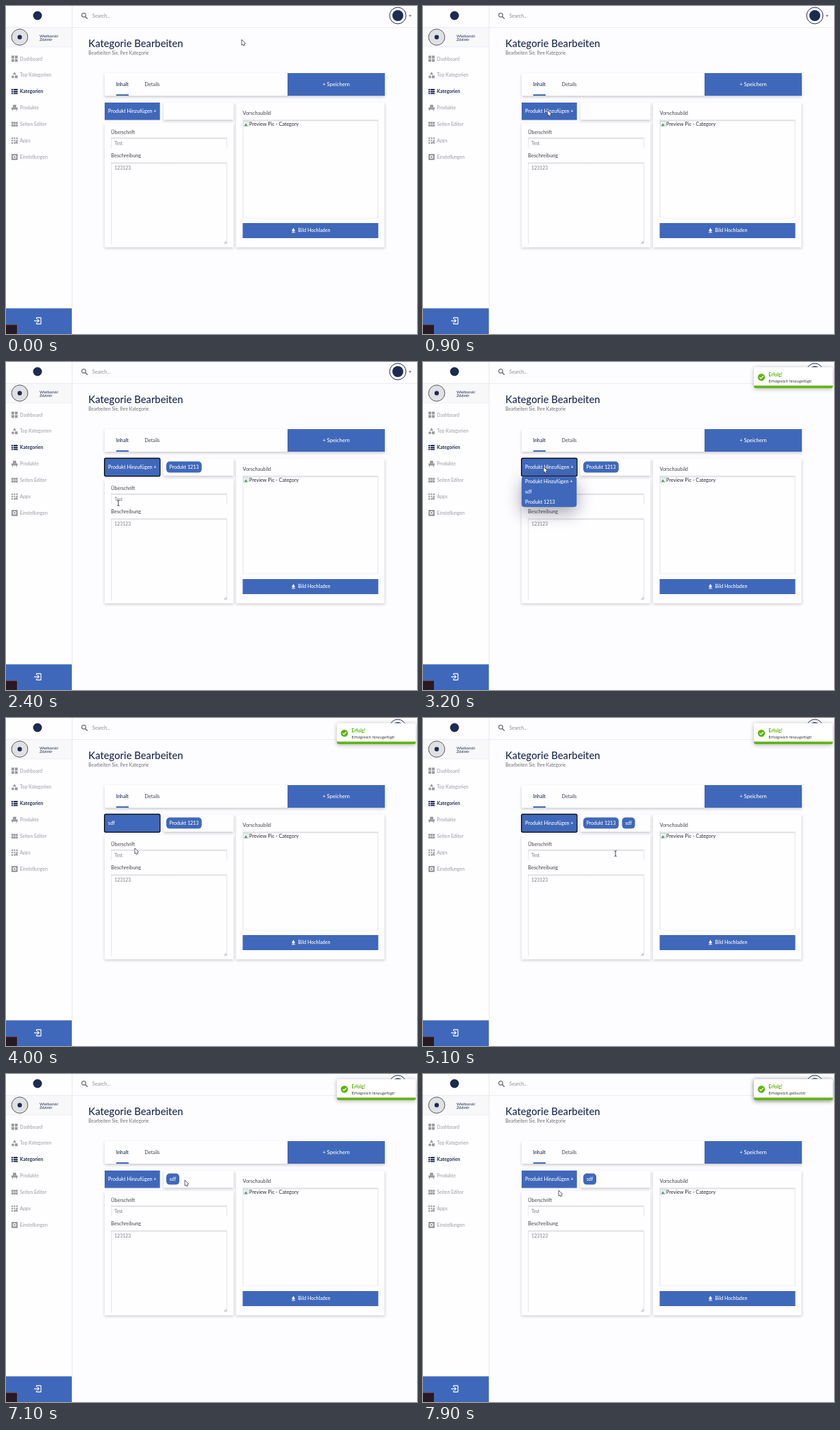
Write an HTML page with a canvas that moves like this. It is 600 px wide and 479 px high and loops after 8 s.

```html
<!DOCTYPE html>
<html lang="de">
<head>
<meta charset="utf-8">
<title>Kategorie Bearbeiten</title>
<style>
html, body { margin: 0; width: 100%; height: 100%; overflow: hidden; background: #fdfcfe; }
canvas { display: block; width: 100vw; height: 100vh; }
</style>
</head>
<body>
<canvas id="stage"></canvas>
<script>
const W = 600, H = 479, LOOP = 8000, STEP = 100, ROW = 14.9;
const BLUE = '#4068ba', NAVY = '#1d2b50', GREY = '#9a9a9e', TEXT = '#43464e', GREEN = '#5fb30f';
const canvas = document.getElementById('stage');
const ctx = canvas.getContext('2d');
const dpr = window.devicePixelRatio || 1;
canvas.width = W * dpr;
canvas.height = H * dpr;

const clamp = k => Math.max(0, Math.min(1, k));
const ease = k => k * k * (3 - 2 * k);
const progress = (t, from, to) => ease(clamp((t - from) / (to - from)));
const between = (v, a, b) => v >= a && v < b;

// Pointer moves, each from wherever the last one ended
const HOME = { x: 344, y: 49 };
const MOVES = [
  { from: 100, to: 900, x: 182, y: 152 },
  { from: 1200, to: 1600, x: 165, y: 200 },
  { from: 1600, to: 1700, x: 164, y: 206 },
  { from: 2700, to: 3100, x: 176, y: 153 },
  { from: 3500, to: 3900, x: 188, y: 190 },
  { from: 4300, to: 5100, x: 281, y: 198 },
  { from: 5200, to: 5800, x: 261, y: 155 },
  { from: 7200, to: 7800, x: 198, y: 170 }
];

function pointerAt(t) {
  return MOVES.reduce((p, m) => {
    const k = progress(t, m.from, m.to);
    return { x: p.x + (m.x - p.x) * k, y: p.y + (m.y - p.y) * k };
  }, HOME);
}

function at(x, y, draw) {
  ctx.save();
  ctx.translate(x, y);
  draw();
  ctx.restore();
}

function rect(x, y, w, h, fill) {
  ctx.fillStyle = fill;
  ctx.fillRect(x, y, w, h);
}

function paint(fill, stroke, width = 1) {
  if (fill) {
    ctx.fillStyle = fill;
    ctx.fill();
  }
  if (stroke) {
    ctx.strokeStyle = stroke;
    ctx.lineWidth = width;
    ctx.stroke();
  }
}

function round(x, y, w, h, r, ...style) {
  ctx.beginPath();
  ctx.roundRect(x, y, w, h, r);
  paint(...style);
}

function disc(x, y, r, ...style) {
  ctx.beginPath();
  ctx.arc(x, y, r, 0, Math.PI * 2);
  paint(...style);
}

function poly(points, ...style) {
  ctx.beginPath();
  points.forEach(p => ctx.lineTo(...p));
  ctx.closePath();
  paint(...style);
}

function line(points, color, width = 1) {
  ctx.beginPath();
  points.forEach(p => ctx.lineTo(...p));
  paint(null, color, width);
}

// Triangle around a centre, pointing up (dir 1) or down (dir -1)
const triangle = (x, y, r, dir, fill) =>
  poly([[x, y - r * dir], [x + r, y + r * dir * 0.7], [x - r, y + r * dir * 0.7]], fill);

function text(str, x, y, size, color, weight = 400, align = 'left') {
  ctx.font = `${weight} ${size}px Lato, "Open Sans", sans-serif`;
  ctx.textAlign = align;
  ctx.fillStyle = color;
  ctx.fillText(str, x, y);
}

function shadowed(blur, dy, alpha, draw) {
  ctx.save();
  ctx.shadowColor = `rgba(40,40,60,${alpha})`;
  ctx.shadowBlur = blur * dpr;
  ctx.shadowOffsetY = dy * dpr;
  draw();
  ctx.restore();
}

const card = (x, y, w, h) => shadowed(4, 1.5, 0.24, () => rect(x, y, w, h, '#fefdff'));

// Field with an inset shadow along the top and sides
function field(x, y, w, h) {
  const g = ctx.createLinearGradient(0, y, 0, y + 3);
  g.addColorStop(0, '#c4c4c9');
  g.addColorStop(1, 'rgba(255,255,255,0)');
  rect(x, y, w, 3, g);
  [x, x + w - 1].forEach(edge => rect(edge, y, 1, h, '#e4e4e8'));
}

// Cells spread evenly over a 9 px icon
function grid(cols, rows, gap, color, height = 9) {
  const w = (9 + gap) / cols, h = (height + gap) / rows;
  for (let i = 0; i < cols * rows; i++) {
    rect(i % cols * w, (9 - height) / 2 + Math.floor(i / cols) * h, w - gap, h - gap, color);
  }
}

const MENU = [
  ['Dashboard', c => grid(2, 2, 1, c)],
  ['Top Kategorien', c => {
    triangle(4.5, 2, 2.5, 1, c);
    disc(2, 7, 2, c);
    rect(5, 5, 4, 4, c);
  }],
  ['Kategorien', c => {
    grid(1, 3, 0.8, c, 7.5);
    rect(2, 0, 0.8, 9, '#fff');
  }],
  ['Produkte', c => {
    round(2, 0, 5, 4, 1, c);
    rect(0, 4, 9, 3, c);
    [1, 7].forEach(x => rect(x, 7, 1, 2, c));
  }],
  ['Seiten Editor', c => grid(3, 2, 0.6, c, 7)],
  ['Apps', c => {
    grid(3, 3, 1.3, c);
    line([[4.5, 9], [9, 4.5]], c, 1.2);
  }],
  ['Einstellungen', c => {
    round(0, 0, 9, 9, 1, c);
    disc(4.5, 4.5, 2, null, '#fff', 1.2);
  }]
];

function sidebar() {
  rect(0, 0, 96, H, '#fefdff');
  rect(96, 0, 1, H, '#e9e9ee');
  disc(46, 14, 6.5, NAVY);
  rect(0, 31, 96, 29, '#f8f8f9');
  rect(0, 59.5, 96, 0.8, '#ececef');
  disc(20, 45.5, 11.8, '#e1e1e4', '#55585f');
  disc(20, 45.5, 3.2, NAVY);
  text('Wielborski', 49, 45.6, 5.7, NAVY);
  text('Zdzimir', 49, 50.6, 5.7, NAVY);
  MENU.forEach(([label, icon], i) => {
    const y = 77 + i * 23.9, active = label === 'Kategorien', color = active ? NAVY : GREY;
    at(8, y - 4.5, () => icon(color));
    text(label, 20.3, y + 2.5, 6.9, color, active ? 700 : 400);
  });
  rect(0, 441.5, 96, 38, BLUE);
  at(46, 459.8, () => {
    round(-1.5, -4.6, 6.5, 9.2, 0.5, null, '#fff', 1.2);
    rect(-2.5, -2.6, 2, 5.2, BLUE);
    line([[-5, 0], [2, 0]], '#fff', 1.2);
    line([[-0.2, -2.4], [2.2, 0], [-0.2, 2.4]], '#fff', 1.2);
  });
  rect(0, 465, 16, 14, '#281a22');
  rect(0, 465, 16, 0.8, '#8a4a68');
}

function header() {
  rect(0, 31, W, 0.8, '#e9e9ee');
  disc(113.5, 13.3, 2.9, null, '#707278', 1.2);
  line([[115.6, 15.4], [119, 18.8]], '#707278', 1.5);
  text('Search...', 126, 17, 7.2, '#8b8d93');
  disc(572, 14, 12, '#fff', NAVY);
  disc(572, 14, 8, NAVY);
  triangle(590, 14.3, 2, -1, '#888a90');
}

function brokenImage(x, y) {
  rect(x, y, 8, 8, '#c9ccd1');
  rect(x + 0.7, y + 0.7, 6.6, 6.6, '#eaf1fb');
  triangle(x + 4, y + 5.6, 2.5, 1, '#5aa34b');
}

function page() {
  rect(0, 0, W, H, '#fdfcfe');
  sidebar();
  header();
  text('Kategorie Bearbeiten', 120.3, 60, 14.8, NAVY, 500);
  text('Bearbeiten Sie, Ihre Kategorie', 120.3, 71.3, 6.75, '#6d7078');

  card(144, 98, 409, 33);
  rect(411, 98, 142, 33, BLUE);
  text('Inhalt', 160.7, 117.2, 7.3, NAVY, 500);
  text('Details', 202.6, 117.2, 7.2, TEXT);
  rect(161, 129, 18, 2, BLUE);
  text('+ Speichern', 482, 117.2, 7.6, '#fff', 500, 'center');

  card(230, 141, 102, 25);
  card(144, 171, 188, 181.5);
  card(336, 141, 216.5, 211.5);

  text('Überschrift', 153.3, 186.6, 7.1, TEXT);
  field(153.3, 192.5, 169.5, 15);
  text('Test', 158.3, 203, 6.7, '#7d8087');
  text('Beschreibung', 153.3, 220.6, 7.4, TEXT);
  field(153.3, 228.7, 169.5, 119.5);
  text('123123', 158.3, 239.4, 6.9, '#7d8087');
  [1.5, 3.5].forEach(d => line([[322 - d, 347], [322, 347 - d]], '#777', 0.7));

  text('Vorschaubild', 345.5, 158.6, 7.35, TEXT);
  field(345.5, 166.5, 198, 143);
  rect(345.5, 309, 198, 0.7, '#eeeef1');
  brokenImage(346.2, 168);
  text('Preview Pic - Category', 355, 174.6, 7.25, '#26282d');
  rect(345.5, 317, 198, 22, BLUE);
  triangle(419.6, 326.6, 2.6, 1, '#fff');
  rect(418.5, 328, 2.2, 1.6, '#fff');
  rect(417, 330.3, 5.2, 0.9, '#fff');
  text('Bild Hochladen', 426.3, 330.4, 7.05, '#fff', 500);
}

function select(label, focused) {
  rect(144, 141, 80.7, 25.5, BLUE);
  text(label, 149, 156, 7.3, '#fff', 500);
  if (focused) round(143.7, 140.5, 81.2, 26.3, 2, null, '#0c0f18', 1.4);
}

function dropdown(hover) {
  const x = 144, y = 167, w = 80.3, h = ROW * 3;
  shadowed(24, 8, 0.42, () => round(x, y, w, h, 4, BLUE));
  if (hover > 0) round(x, y + hover * ROW, w, ROW, hover === 2 ? [0, 0, 4, 4] : 0, '#2168d0');
  ['Produkt Hinzufügen +', 'sdf', 'Produkt 1213'].forEach((label, i) =>
    text(label, x + 5, y + 10 + i * ROW, 7.2, '#fff', 500));
}

function chip(x, w, label, trash) {
  const mid = x + w / 2;
  round(x, 145.2, w, 16.4, 5, BLUE);
  if (!trash) return text(label, mid, 156.1, 7.05, '#fff', 500, 'center');
  rect(mid - 3.2, 150, 6.4, 1, '#fff');
  rect(mid - 1.4, 149.3, 2.8, 1, '#fff');
  round(mid - 2.7, 151.7, 5.4, 6.2, [0, 0, 1, 1], '#fff');
}

function toast(t, from, message) {
  if (t < from) return;
  at(483 + 120 * (1 - progress(t, from, from + 500)), 7.5, () => {
    shadowed(6, 1, 0.35, () => round(0, 0, 115.3, 30.7, 3, '#fff'));
    round(0, 26.9, 115.3, 3.8, [0, 0, 3, 3], GREEN);
    disc(11, 14.7, 5.2, GREEN);
    line([[8.4, 14.8], [10.3, 16.7], [13.8, 13]], '#fff', 1.2);
    text('Erfolg!', 21.5, 13.2, 6.9, GREEN, 700);
    text(message, 21.5, 22, 6.05, '#3b3d42');
  });
}

function arrow() {
  line([[2, 5], [3.7, 9]], '#33353b', 2.6);
  poly([[0, 0], [0, 8], [5.6, 5.6]], '#fff', '#33353b', 0.8);
  line([[2, 5], [3.5, 8.6]], '#fff', 1.2);
}

function beam() {
  line([[0, -3.6], [0, 3.6]], '#25272c', 0.9);
  [-1, 1].forEach(s => line([[-1.8, s * 4.2], [0, s * 3.4], [1.8, s * 4.2]], '#25272c', 0.8));
}

function hand() {
  round(-2.4, 4, 7, 6, 2, '#fff', '#22242a', 0.8);
  round(-0.9, -0.3, 1.8, 6, 0.9, '#fff', '#22242a', 0.8);
  rect(-0.5, 4, 1, 3, '#fff');
}

function frame(t) {
  const { x, y } = pointerAt(t);
  const open = between(t, 1100, 1900) || between(t, 3200, 4000);
  const added = t >= 2300, removed = t >= 6600;
  const overChip = !open && added && !removed && between(x, 234, 286) && between(y, 145, 162);
  const overField = !open && between(x, 153, 323) && between(y, 193, 208);
  const label = between(t, 1900, 2300) ? 'Produkt 1213'
    : between(t, 4000, 4600) ? 'sdf' : 'Produkt Hinzufügen +';

  page();
  select(label, between(t, 1000, 6000));
  if (added && !removed) chip(234, 51.7, 'Produkt 1213', overChip);
  if (t >= 4600) chip(removed ? 234 : 290.5, 19, 'sdf');
  if (open) dropdown(Math.min(2, Math.floor((y - 167) / ROW)));
  toast(t, 2700, 'Erfolgreich hinzugefügt!');
  toast(t, 7200, 'Erfolgreich gelöscht!');
  at(x, y, overChip ? hand : overField ? beam : arrow);
}

const start = performance.now();
function tick() {
  const t = Math.max(0, performance.now() - start) % LOOP;
  ctx.setTransform(dpr, 0, 0, dpr, 0, 0);
  frame(Math.floor(t / STEP) * STEP);
  requestAnimationFrame(tick);
}
tick();
</script>
</body>
</html>
```
